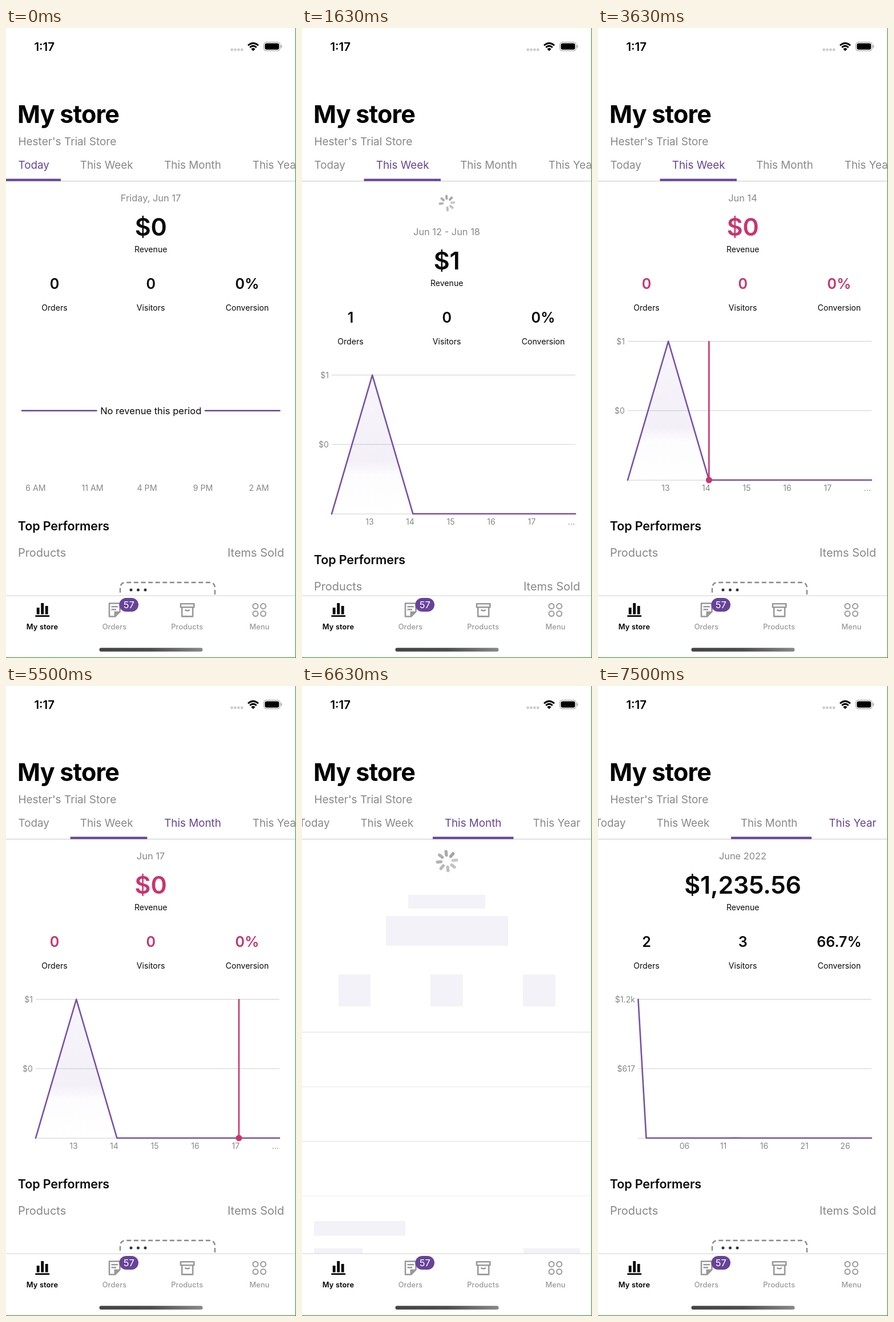
Animation, 508 px wide and 1101 px high, one loop 8000 ms. Source, as an HTML page:

```html
<!DOCTYPE html>
<html lang="en">
<head>
<meta charset="utf-8">
<title>Store dashboard</title>
<style>
html, body { margin: 0; width: 100%; height: 100%; overflow: hidden; background: #fff; }
svg { display: block; width: 508px; height: 1101px; font-family: Inter, "Open Sans", sans-serif; }
</style>
</head>
<body>
<svg id="stage" viewBox="0 0 508 1101" xmlns="http://www.w3.org/2000/svg">
  <defs>
    <clipPath id="pageClip"><rect y="268" width="507" height="724"/></clipPath>
    <linearGradient id="area" x1="0" y1="547" x2="0" y2="790" gradientUnits="userSpaceOnUse">
      <stop offset="0" stop-color="#7f54b3" stop-opacity=".06"/>
      <stop offset=".62" stop-color="#7f54b3" stop-opacity=".09"/>
      <stop offset=".72" stop-color="#7f54b3" stop-opacity=".02"/>
      <stop offset="1" stop-color="#7f54b3" stop-opacity="0"/>
    </linearGradient>
    <linearGradient id="home">
      <stop offset="0" stop-color="#444"/>
      <stop offset=".5" stop-color="#4c4c4c"/>
      <stop offset="1" stop-color="#888"/>
    </linearGradient>
  </defs>
</svg>
<script>
const NS = "http://www.w3.org/2000/svg";
const LOOP = 8000, W = 508, PULL = 79;
const PURPLE = "#674399", LINE = "#7650aa", PINK = "#c9356e", GRAY = "#888", INK = "#0a0a0a";
const stage = document.getElementById("stage");

function el(parent, tag, attrs = {}) {
  const node = document.createElementNS(NS, tag);
  for (const key in attrs) node.setAttribute(key, attrs[key]);
  parent.appendChild(node);
  return node;
}
function text(parent, str, x, y, size, fill = INK, extra = {}) {
  const node = el(parent, "text", { x, y, "font-size": size, fill, ...extra });
  node.textContent = str;
  return node;
}
const MID = { "text-anchor": "middle" }, END = { "text-anchor": "end" };
const rect = (g, x, y, width, height, fill, rx = 0) => el(g, "rect", { x, y, width, height, fill, rx });
const path = (g, d, stroke, width, extra = {}) =>
  el(g, "path", { d, stroke, "stroke-width": width, fill: "none", ...extra });
const move = (node, x, y) => node.setAttribute("transform", `translate(${x} ${y})`);
const show = (node, on) => node.setAttribute("visibility", on ? "visible" : "hidden");
const clamp = x => Math.max(0, Math.min(1, x));
const ease = x => { x = clamp(x); return x * x * (3 - 2 * x); };
const mix = (a, b, p) => a + (b - a) * p;

// Header
function drawHeader() {
  const g = el(stage, "g");
  text(g, "1:17", 49.4, 39.5, 20.4, "#000", { "font-weight": 600 });
  for (let i = 0; i < 4; i++) el(g, "circle", { cx: 395.6 + i * 5.9, cy: 38, r: 2.4, fill: "#ccc" });
  path(g, "M424 30.5Q433 22.5 442 30.5M427.2 34Q433 28.8 438.8 34", "#000", 3);
  el(g, "path", { d: "M429.2 36.4Q433 33.4 436.8 36.4L433 40.3Z" });
  el(g, "rect", { x: 451.6, y: 24.8, width: 28.6, height: 14.8, rx: 4.6, fill: "none", stroke: "#a5a5a5", "stroke-width": 1.2 });
  rect(g, 453.5, 26.7, 24.8, 11, "#000", 3);
  rect(g, 481.6, 29.8, 1.8, 5, "#a5a5a5", 1);
  text(g, "My store", 20, 165.5, 43, "#000", { "font-weight": 700, "letter-spacing": -.8 });
  text(g, "Hester's Trial Store", 21.4, 205, 19, GRAY);
}

// Period tabs
const tabNames = [["Today", 21.5], ["This Week", 129.8], ["This Month", 277.2], ["This Year", 431.8]];
const barStops = [[0, 96], [108.5, 134.5], [256.3, 141.5], [411.5, 124]];
let tabRow, tabTexts, bar;
function drawTabs() {
  rect(stage, 0, 267, 507, 1.2, "#d0d0d0");
  tabRow = el(stage, "g");
  tabTexts = tabNames.map(([name, x]) => text(tabRow, name, x, 246, 18.8, GRAY));
  bar = rect(tabRow, 0, 263.5, 96, 4, PURPLE);
}

// Pages
const pages = el(stage, "g", { "clip-path": "url(#pageClip)" });
const columns = [["Orders", 85], ["Visitors", 253.7], ["Conversion", 422.5]];

function makePage({ date, total, stats, labels, centers, grid, left, line, fill }) {
  const root = el(pages, "g"), body = el(root, "g");
  const bold = { ...MID, "font-weight": 600 };
  const dateText = text(body, date, 253.5, 303, 16.4, GRAY, MID);
  const values = [text(body, total, 253.6, 362.6, 43, INK, { ...bold, "letter-spacing": -.2 })];
  text(body, "Revenue", 253.7, 392, 14.1, INK, MID);
  columns.forEach(([name, x], i) => {
    values.push(text(body, stats[i], x, 456, 25.1, INK, bold));
    text(body, name, x, 494, 14.1, INK, MID);
  });
  if (line) {
    [547.5, 668.7, 790.2].forEach((y, i) => {
      path(body, `M${left} ${y}H479`, "#cfcfcf", 1.1);
      if (grid[i]) text(body, grid[i], left - 5, y + 5, 14.1, GRAY, END);
    });
    if (fill) el(body, "path", { d: fill, fill: "url(#area)" });
    path(body, line, LINE, 2.6, { "stroke-linejoin": "round", "stroke-linecap": "round" });
  } else {
    path(body, "M28 668.7H158.5M349 668.7H479.5", PURPLE, 2.6, { "stroke-linecap": "round" });
    text(body, "No revenue this period", 253.7, 674.7, 16.5, INK, MID);
  }
  labels.forEach((s, i) => text(body, s, centers[i], 809, 14.2, GRAY, MID));
  text(body, "Top Performers", 20.8, 878, 21.5, INK, { "font-weight": 600, "letter-spacing": -.12 });
  text(body, "Products", 20.9, 924, 20, GRAY);
  text(body, "Items Sold", 487.2, 924, 20, GRAY, END);
  path(body, "M200 1010V979Q200 969 210 969H356Q366 969 366 979V1010", GRAY, 2.3,
    { "stroke-dasharray": "8 4.6", "stroke-dashoffset": 2 });
  [219, 231.5, 244].forEach(cx => el(body, "circle", { cx, cy: 982, r: 2.5, fill: "#333" }));
  return { root, body, dateText, values };
}

const today = makePage({
  date: "Friday, Jun 17", total: "$0", stats: ["0", "0", "0%"],
  labels: ["6 AM", "11 AM", "4 PM", "9 PM", "2 AM"], centers: [52, 151.5, 247, 345, 443]
});
const week = makePage({
  date: "Jun 12 - Jun 18", total: "$1", stats: ["1", "0", "0%"],
  labels: ["13", "14", "15", "16", "17", "..."], centers: [118.5, 189.5, 260.5, 331.5, 402.5, 472],
  grid: ["$1", "$0"], left: 52,
  line: "M52 790L123.2 547.5L194.4 790H479", fill: "M52 790L123.2 547.5L194.4 790Z"
});
const month = makePage({
  date: "June 2022", total: "$1,235.56", stats: ["2", "3", "66.7%"],
  labels: ["06", "11", "16", "21", "26"], centers: [151.5, 219.5, 291, 361.5, 433],
  grid: ["$1.2k", "$617"], left: 70,
  line: "M70.4 547.5L84.5 790H225L239.4 789.7L253.5 790H479"
});

const marker = el(week.body, "g");
path(marker, "M0 547V790", PINK, 2.6);
const dot = el(marker, "circle", { r: 5.5, fill: PINK });

// Loading state: placeholder blocks and spinner
function addLoader(page, start, done) {
  const ghost = el(page.root, "g");
  [[605, "#dcdcdc"], [700.5, "#e8e8e8"], [796, "#dcdcdc"], [891, "#eee"]]
    .forEach(([y, c]) => path(ghost, `M0 ${y}H507`, c, 1.1));
  const blocks = el(ghost, "g");
  [[186, 365, 135, 24], [147, 402, 214, 52], [64, 504, 56, 56], [225, 504, 57, 56],
   [387, 504, 57, 56], [21, 935, 160, 26], [21, 982.5, 85, 24], [388, 982.5, 99, 24]]
    .forEach(b => rect(blocks, ...b, "#f3f2f8"));
  const spinner = el(page.root, "g");
  const spokes = Array.from({ length: 8 }, (_, i) =>
    path(spinner, "M0 -10.5V-16.8", "#8c8c8c", 5.4, {
      "stroke-linecap": "round", transform: `rotate(${i * 45 - 90})`
    }));
  Object.assign(page, { start, done, ghost, blocks, spinner, spokes });
}
addLoader(week, 500, 1480);
addLoader(month, 5500, 6680);

function updateLoader(page, t) {
  const loading = t < page.done, end = clamp((t - page.done) / 460), p = ease(end);
  show(page.ghost, loading);
  show(page.body, !loading);
  page.blocks.setAttribute("opacity", ease((t - page.start - 450) / 280));
  move(page.body, 0, PULL * (1 - p));
  page.spinner.setAttribute("opacity", end < 1 ? clamp((t - page.start - 350) / 250) : 0);
  page.spinner.setAttribute("transform",
    `translate(254 306) rotate(${mix(-6, 0, p)}) scale(${1 - p})`);
  const head = (t - page.start) / 100;
  page.spokes.forEach((s, i) => {
    const age = (((head - i) % 8) + 8) % 8;
    s.setAttribute("opacity", i < 8.6 * (1 - p) ? .8 - age * .045 : 0);
  });
}

function updateSelection(t) {
  const day = t < 2960 ? 0 : t < 3430 ? 13 : t < 4560 ? 14 : 17;
  const amount = day > 13 ? 0 : 1;
  week.dateText.textContent = day ? "Jun " + day : "Jun 12 - Jun 18";
  week.values[0].textContent = "$" + amount;
  week.values[1].textContent = amount;
  week.values.forEach(v => v.setAttribute("fill", day ? PINK : INK));
  marker.setAttribute("display", day ? "inline" : "none");
  move(marker, 52 + (day - 12) * 71.2, 0);
  dot.setAttribute("cy", amount ? 547.5 : 790);
}

// Bottom navigation
function drawNav() {
  const g = el(stage, "g"), c = "#999";
  rect(g, 0, 992, 507, 109, "#fff");
  rect(g, 0, 991.5, 507, 1.2, "#d9d9d9");
  rect(g, 53.8, 1013, 4.8, 11.5, "#000");
  rect(g, 61.3, 1005, 4.8, 19.5, "#000");
  rect(g, 68.8, 1010, 4.8, 14.5, "#000");
  rect(g, 51.3, 1026.3, 24.8, 2.7, "#000");
  path(g, "M181 1005.5H199.5V1020L191 1028.5H181Z", c, 2.6, { "stroke-linejoin": "round" });
  path(g, "M184.5 1011.3H196M184.5 1016.3H193", c, 2.4);
  el(g, "path", { d: "M189.5 1019.5H200L189.5 1029Z", fill: c });
  path(g, "M306 1006.3H329.4V1012.2H306ZM308.2 1012V1028.4H327.2V1012", c, 2.6, { "stroke-linejoin": "round" });
  path(g, "M313.5 1016.7Q317.7 1020 321.9 1016.7", c, 2.4);
  for (const cx of [437, 450.6]) for (const cy of [1010.4, 1023.6])
    el(g, "circle", { cx, cy, r: 4.5, fill: "none", stroke: c, "stroke-width": 2 });
  rect(g, 198.5, 996, 33.5, 24, PURPLE, 12);
  text(g, "57", 215.3, 1014, 16.5, "#fff", MID);
  [["My store", 63.5], ["Orders", 190], ["Products", 317.2], ["Menu", 444]].forEach(([s, x], i) =>
    text(g, s, x, 1051, 12.8, i ? c : "#000", { ...MID, "font-weight": i ? 500 : 600, "letter-spacing": .15 }));
  rect(g, 163.5, 1083.2, 181, 6.5, "url(#home)", 3.2);
  rect(g, 507, 0, 1, 1101, "#2a8a2a");
  rect(g, 0, 1100, 508, 1, "#2a8a2a");
}

// The tab bar reacts to a tap slightly before the page moves
const LEAD = 32, TAPS = [500, 5500, 7500];
const swipe = (t, start, lead = 0) => t < start ? 0 : ease((t - start + lead) / 330);

function render(t) {
  const toMonth = swipe(t, TAPS[1]), pos = swipe(t, TAPS[0]) + toMonth;
  const held = Math.min(t, TAPS[2]);
  const at = TAPS.reduce((sum, tap) => sum + swipe(held, tap, LEAD), 0);
  const active = TAPS.filter(tap => t >= tap).length;
  tabTexts.forEach((n, i) => n.setAttribute("fill", i === active ? PURPLE : GRAY));
  move(tabRow, -27.3 * toMonth, 0);
  const i = Math.min(2, Math.floor(at)), f = at - i;
  bar.setAttribute("x", mix(barStops[i][0], barStops[i + 1][0], f));
  bar.setAttribute("width", mix(barStops[i][1], barStops[i + 1][1], f));
  [today, week, month].forEach((page, n) => {
    move(page.root, W * (n - pos), 0);
    page.root.setAttribute("display", Math.abs(n - pos) < 1 ? "inline" : "none");
  });
  updateLoader(week, t);
  updateLoader(month, t);
  updateSelection(t);
}

drawHeader();
drawTabs();
drawNav();
function tick() {
  render(performance.now() % LOOP);
  requestAnimationFrame(tick);
}
tick();
</script>
</body>
</html>
```
